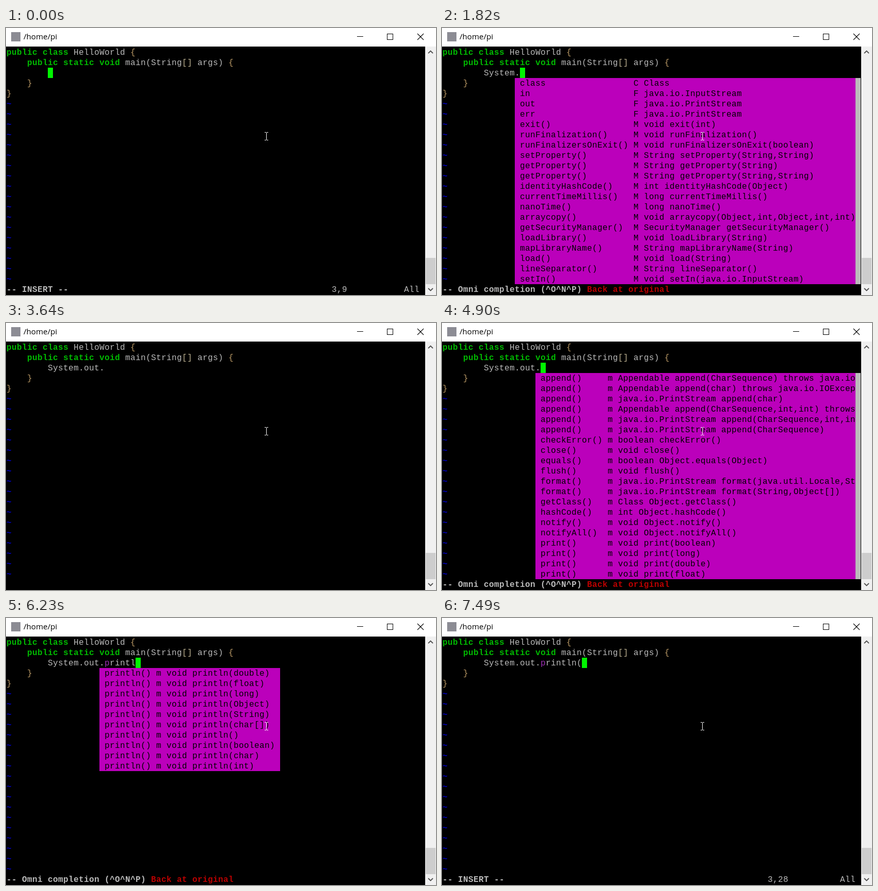
Animation of 833 by 518 pixels, one loop 8000 ms. Source, as an HTML page with a canvas:

```html
<!DOCTYPE html>
<html lang="en">
<head>
<meta charset="utf-8">
<title>/home/pi</title>
<style>
html, body { margin: 0; width: 100%; height: 100%; overflow: hidden; background: #000; }
canvas { display: block; }
</style>
</head>
<body>
<canvas id="stage" width="833" height="518"></canvas>
<script>
const ctx = document.getElementById('stage').getContext('2d');
const LOOP = 8000, CELL = 10, ROW = 20, LEFT = 1, TOP = 37, COLS = 80, MAX_ROWS = 20;
const MONO = '"Liberation Mono", "Courier New", monospace';
const GREY = '#bbbbbb', GREEN = '#00bb00', RED = '#bb0000', BLUE = '#0000bb';
const BRACE = '#bb9a66', BRACKET = '#bbb090', PURPLE = '#a030b8', PINK = '#bb00bb';

// Each menu entry is [word, kind, description].
const menu = (kind, rows) => rows.map(([word, info, k]) => [word, k || kind, info]);

const systemMenu = menu('M', [
  ['class', 'Class', 'C'],
  ['in', 'java.io.InputStream', 'F'],
  ['out', 'java.io.PrintStream', 'F'],
  ['err', 'java.io.PrintStream', 'F'],
  ['exit()', 'void exit(int)'],
  ['runFinalization()', 'void runFinalization()'],
  ['runFinalizersOnExit()', 'void runFinalizersOnExit(boolean)'],
  ['setProperty()', 'String setProperty(String,String)'],
  ['getProperty()', 'String getProperty(String)'],
  ['getProperty()', 'String getProperty(String,String)'],
  ['identityHashCode()', 'int identityHashCode(Object)'],
  ['currentTimeMillis()', 'long currentTimeMillis()'],
  ['nanoTime()', 'long nanoTime()'],
  ['arraycopy()', 'void arraycopy(Object,int,Object,int,int)'],
  ['getSecurityManager()', 'SecurityManager getSecurityManager()'],
  ['loadLibrary()', 'void loadLibrary(String)'],
  ['mapLibraryName()', 'String mapLibraryName(String)'],
  ['load()', 'void load(String)'],
  ['lineSeparator()', 'String lineSeparator()'],
  ['setIn()', 'void setIn(java.io.InputStream)'],
  ['setOut()', 'void setOut(java.io.PrintStream)']
]);

const STREAM = 'java.io.PrintStream ';
const overloads = (name, args) =>
  args.split(' ').map(a => [name + '()', `void ${name}(${a === '-' ? '' : a})`]);

const outMenu = menu('m', [
  ['append()', 'Appendable append(CharSequence) throws java.io.IOException'],
  ['append()', 'Appendable append(char) throws java.io.IOException'],
  ['append()', STREAM + 'append(char)'],
  ['append()', 'Appendable append(CharSequence,int,int) throws java.io.IOException'],
  ['append()', STREAM + 'append(CharSequence,int,int)'],
  ['append()', STREAM + 'append(CharSequence)'],
  ['checkError()', 'boolean checkError()'],
  ['close()', 'void close()'],
  ['equals()', 'boolean Object.equals(Object)'],
  ['flush()', 'void flush()'],
  ['format()', STREAM + 'format(java.util.Locale,String,Object[])'],
  ['format()', STREAM + 'format(String,Object[])'],
  ['getClass()', 'Class Object.getClass()'],
  ['hashCode()', 'int Object.hashCode()'],
  ['notify()', 'void Object.notify()'],
  ['notifyAll()', 'void Object.notifyAll()'],
  ...overloads('print', 'boolean long double float Object String char[] char int'),
  ['printf()', STREAM + 'printf(String,Object[])'],
  ['printf()', STREAM + 'printf(java.util.Locale,String,Object[])'],
  ...overloads('println', 'double float long Object String char[] - boolean char int')
]);

// [time, typed text, mode, selected match]
const steps = [
  [0, '', 'insert'],
  [560, 'S', 'insert'],
  [840, 'Sy', 'insert'],
  [980, 'Sys', 'insert'],
  [1190, 'Syst', 'insert'],
  [1260, 'Syste', 'insert'],
  [1400, 'System', 'insert'],
  [1820, 'System.', 'menu'],
  [2310, 'System.o', 'menu'],
  [2450, 'System.ou', 'menu'],
  [3290, 'System.out', 'menu'],
  [3640, 'System.out.', 'wait'],
  [4900, 'System.out.', 'menu'],
  [5530, 'System.out.p', 'menu'],
  [5740, 'System.out.pr', 'menu'],
  [5810, 'System.out.pri', 'menu'],
  [5950, 'System.out.prin', 'menu'],
  [6020, 'System.out.print', 'menu'],
  [6230, 'System.out.printl', 'menu'],
  [6440, 'System.out.println', 'menu'],
  [7000, 'System.out.println', 'menu', 28],
  [7210, 'System.out.println', 'menu', 29],
  [7490, 'System.out.println(', 'insert']
];

const colX = c => LEFT + c * CELL;
const rowY = r => TOP + r * ROW;

function box(x, y, w, h, color) {
  ctx.fillStyle = color;
  ctx.fillRect(x, y, w, h);
}

function cells(text, col, row, color = GREY, bold = false) {
  ctx.font = `${bold ? 'bold ' : ''}16px ${MONO}`;
  ctx.fillStyle = color;
  [...text].forEach((ch, i) => {
    if (ch !== ' ' && col + i < COLS) ctx.fillText(ch, colX(col + i), rowY(row) + 15);
  });
}

function line(color, width, ...points) {
  ctx.strokeStyle = color;
  ctx.lineWidth = width;
  ctx.beginPath();
  points.forEach(([x, y], i) => i ? ctx.lineTo(x, y) : ctx.moveTo(x, y));
  ctx.stroke();
}

function drawWindow() {
  box(0, 0, 833, 518, '#000');
  box(0, 0, 833, 36, '#fff');
  box(10, 8, 18, 18, '#8c8c94');
  ctx.font = '15.1px "Open Sans", "Noto Sans", sans-serif';
  ctx.fillStyle = '#000';
  ctx.fillText('/home/pi', 34, 22);

  box(680, 16, 12, 1, '#000');
  ctx.strokeStyle = '#000';
  ctx.lineWidth = 1;
  ctx.strokeRect(738.5, 11.5, 11, 11);
  line('#000', 1.1, [797, 11], [809, 23]);
  line('#000', 1.1, [809, 11], [797, 23]);

  box(812, 36, 21, 482, '#f0f0f0');
  box(813, 446, 19, 51, '#cdcdcd');
  line('#505050', 1.8, [818, 49], [822.5, 44.5], [827, 49]);
  line('#505050', 1.8, [818, 505], [822.5, 509.5], [827, 505]);
}

function drawCode(typed) {
  cells('public class', 0, 0, GREEN, true);
  cells('HelloWorld', 13, 0);
  cells('{', 24, 0, BRACE);
  cells('public static void', 4, 1, GREEN, true);
  cells('main(String', 23, 1);
  cells('[]', 34, 1, BRACKET);
  cells('args)', 37, 1);
  cells('{', 43, 1, BRACE);
  cells(typed.slice(0, 11), 8, 2);
  cells(typed.slice(11, 12), 19, 2, PURPLE);
  cells(typed.slice(12), 20, 2);
  cells('}', 4, 3, BRACE);
  cells('}', 0, 4, BRACE);
  for (let r = 5; r < 23; r++) cells('~', 0, r, BLUE, true);
}

function drawMenu(typed, match) {
  const dot = typed.lastIndexOf('.');
  const prefix = typed.slice(dot + 1);
  const all = dot > 6 ? outMenu : systemMenu;
  const items = all.filter(([word]) => word.startsWith(prefix));
  const col = 8 + dot;
  const kindCol = col + 2 + Math.max(...items.map(([word]) => word.length));
  const widest = Math.max(...items.map(item => item[2].length));
  const end = Math.min(COLS, kindCol + 3 + widest);
  const shown = items.slice(0, MAX_ROWS);
  const width = (end - col) * CELL;

  box(colX(col), rowY(3), width, shown.length * ROW, PINK);
  if (items.length > MAX_ROWS) box(colX(COLS), rowY(3), CELL, MAX_ROWS * ROW, GREY);
  shown.forEach((item, i) => {
    const row = 3 + i;
    if (item === all[match - 1]) {
      box(colX(col), rowY(row), width, ROW, '#000');
      return;
    }
    cells(item[0], col + 1, row, '#000');
    cells(item[1], kindCol, row, '#000');
    cells(item[2], kindCol + 2, row, '#000');
  });
}

function drawStatus(typed, mode, match) {
  if (mode === 'insert') {
    cells('-- INSERT --', 0, 23, GREY, true);
    cells('3,' + (typed.length + 9), 63, 23);
    cells('All', 77, 23);
  } else if (mode === 'menu') {
    cells('-- Omni completion (^O^N^P)', 0, 23, GREY, true);
    if (match) cells(`match ${match} of 44`, 28, 23, GREEN, true);
    else cells('Back at original', 28, 23, RED, true);
  }
}

function drawPointer() {
  box(504, 203, 1, 14, '#fff');
  for (const y of [202, 217]) {
    box(501, y, 3, 1, '#fff');
    box(505, y, 3, 1, '#fff');
  }
}

function draw(time) {
  const [, typed, mode, match] = steps.filter(s => s[0] <= time).pop();
  drawWindow();
  drawCode(typed);
  if (mode === 'menu') drawMenu(typed, match);
  drawStatus(typed, mode, match);
  if (mode !== 'wait') box(colX(8 + typed.length), rowY(2), CELL, ROW, '#00f400');
  drawPointer();
}

const start = performance.now();
function tick() {
  draw((performance.now() - start) % LOOP);
  requestAnimationFrame(tick);
}
tick();
</script>
</body>
</html>
```
